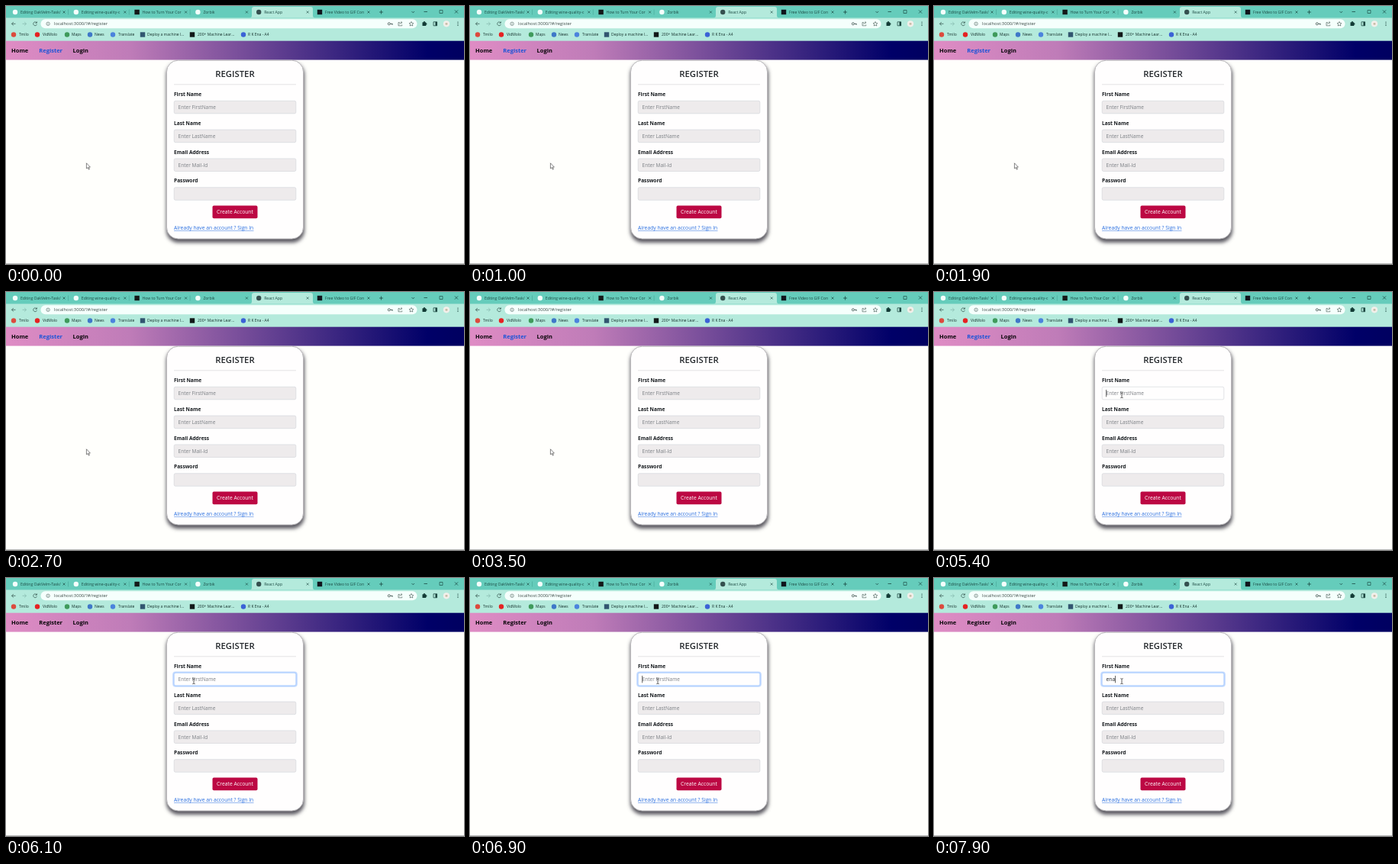
Recreate the animation shown at these times as an HTML page. Size 600x338 px, loop 8000 ms.

```html
<!DOCTYPE html>
<html lang="en">
<head>
<meta charset="utf-8">
<title>Register</title>
<style>
  html, body { margin: 0; width: 100%; height: 100%; overflow: hidden; background: #fffffc; }
  svg { display: block; width: 600px; height: 338px; font-family: "Open Sans", "Noto Sans", sans-serif; }
  text { white-space: pre; }
</style>
</head>
<body>
<svg id="stage" viewBox="0 0 600 338">
  <defs>
    <linearGradient id="bar">
      <stop offset="0" stop-color="#df8cc4"/>
      <stop offset=".27" stop-color="#bf7cb8"/>
      <stop offset=".92" stop-color="#000068"/>
      <stop offset="1" stop-color="#000060"/>
    </linearGradient>
    <filter id="soft" x="-10%" y="-10%" width="120%" height="120%">
      <feGaussianBlur stdDeviation="2.8"/>
    </filter>
  </defs>
</svg>
<script>
const LOOP = 8000;
const stage = document.getElementById('stage');
const INK = '#123b35';

function add(tag, attrs, parent = stage) {
  const node = document.createElementNS('http://www.w3.org/2000/svg', tag);
  for (const key in attrs) node.setAttribute(key, attrs[key]);
  parent.append(node);
  return node;
}
const rect = (x, y, width, height, fill, rx = 0, more) =>
  add('rect', { x, y, width, height, fill, rx, ...more });
const dot = (cx, cy, r, fill) => add('circle', { cx, cy, r, fill });
const line = (d, stroke = INK, width = 0.7, more) =>
  add('path', { d, stroke, fill: 'none', 'stroke-width': width, ...more });
function label(text, x, y, size, fill = '#212529', more) {
  const node = add('text', { x, y, 'font-size': size, fill, ...more });
  node.textContent = text;
  return node;
}
const cross = (x, y, r, color, width) =>
  line(`M${x - r} ${y - r}l${2 * r} ${2 * r}m0 ${-2 * r}l${-2 * r} ${2 * r}`, color, width);

function drawTabs() {
  rect(0, 0, 600, 16, '#65ccbb');
  add('path', { d: 'M319 15.5q3 0 3-3V4q0-3 3-3H399q3 0 3 3v8.500q0 3 3 3z', fill: '#b4eadc' });
  const tabs = [
    ['Editing OakVelm-Task/Fi', '#f4fffc', 'circle'],
    ['Editing wine-quality-c', '#f4fffc', 'circle'],
    ['How to Turn Your Cor', '#141818', 'square'],
    ['Zorbik', '#f4fffc', 'circle'],
    ['React App', '#35504f', 'circle'],
    ['Free Video to GIF Con', '#10141c', 'square']
  ];
  tabs.forEach(([title, color, shape], i) => {
    const x = 12 + i * 79.8;
    if (shape === 'circle') dot(x, 8, 3.2, color);
    else rect(x - 3.2, 4.8, 6.4, 6.4, color);
    const clip = add('clipPath', { id: 'tab' + i });
    add('rect', { x: x + 6, y: 0, width: 54, height: 16 }, clip);
    label(title, x + 7, 10, 5.1, '#1c4a43', { 'clip-path': `url(#tab${i})` });
    cross(x + 64, 8, 1.5, INK, 0.6);
    if (i < 3) line(`M${x + 69.500} 4.500v7`, '#3f9c8d', 0.5);
  });
  line('M489 8h5m-2.500-2.500v5');
  line('M531.5 7l1.800 1.800 1.800-1.800');
  line('M547.5 7.500h4.500');
  line('M568 5.500h4v4h-4z', INK, 0.6);
  cross(590, 7.5, 2.1, INK, 0.65);
}

function drawToolbar() {
  rect(0, 15.5, 600, 30.5, '#b4eadc');
  rect(45.5, 17.3, 493, 12, '#f5fffc', 6);
  line('M12.500 23.300h-5m2.300-2.300l-2.300 2.300 2.300 2.300', '#2b4b46');
  line('M21.500 23.300h5m-2.300-2.300l2.300 2.300-2.300 2.300', '#83b7ab');
  line('M40.200 22a2.400 2.400 0 1 0 .2 2.200m0-3.800v1.900h-1.900', '#2b4b46');
  line('M57.300 23.300a2.200 2.200 0 1 1-4.400 0a2.200 2.200 0 1 1 4.400 0M55.100 23v1.400m0-2.500v.5', '#4a5f5b', 0.6);
  label('localhost:3000/?#/register', 63, 25.3, 5.8, '#3c4a48');
  line('M503.300 23.300a1.500 1.500 0 1 1-3 0a1.500 1.500 0 1 1 3 0h3v1.400m-1.200-1.400v1', '#3b4f4b', 0.8);
  line('M515.800 21.500h-1.800v4.300h4.800v-1.300m-3.300-.6q.2-2.300 3.300-2.300m-1.300-1.300l1.500 1.300-1.500 1.400', '#3b4f4b', 0.6);
  line('M531 20.500l.9 1.900 2 .2-1.500 1.400.4 2-1.800-1-1.800 1 .4-2-1.500-1.400 2-.2z', '#3b4f4b', 0.6);
  rect(545.5, 21.2, 4.8, 4.8, INK, 0.6);
  dot(548, 21, 1, INK);
  dot(550.5, 23.5, 1, INK);
  line('M560 20.800h4.600v5h-4.600z', INK, 0.7);
  rect(562.5, 20.8, 2.1, 5, INK);
  dot(577, 23.3, 4.1, '#f2efea');
  rect(575.5, 22, 3, 2.7, '#c9bda8', 1);
  [21.2, 23.3, 25.4].forEach(y => dot(592, y, 0.6, INK));

  const marks = [
    [10, 'Tmilo', '#dc4a3d', 17],
    [41, 'VidMolo', '#e52222', 48],
    [80, 'Maps', '#3f9a5b', 86],
    [110, 'News', '#3f78c8', 116],
    [140, 'Translate', '#4b83dd', 147],
    [179, 'Deploy a machine l...', '#31556f', 185],
    [244, '200+ Machine Lear...', '#111818', 251],
    [311, 'R K Ena - A4', '#3b62d6', 317]
  ];
  marks.forEach(([x, name, color, at], i) => {
    if (i === 5 || i === 6) rect(x - 3.2, 34.3, 6.4, 6.4, color);
    else dot(x, 37.5, 3.2, color);
    label(name, at, 39.3, 5, '#15302b');
  });
}

function drawNav() {
  rect(0, 45.7, 600, 24.9, 'url(#bar)');
  const item = (name, x) => label(name, x, 61.4, 7.5, '#080508', { 'font-weight': 700 });
  item('Home', 7);
  item('Login', 87.6);
  return item('Register', 43.3);
}

function drawForm() {
  const fields = [['First Name', 'Enter FirstName'], ['Last Name', 'Enter LastName'],
    ['Email Address', 'Enter Mail-Id'], ['Password', '']];
  const clip = add('clipPath', { id: 'page' });
  add('rect', { x: 0, y: 70.6, width: 600, height: 268 }, clip);
  const shade = add('g', { 'clip-path': 'url(#page)' });
  shade.append(rect(210, 74, 181, 236, '#5a5860', 16, { filter: 'url(#soft)' }));
  rect(210.5, 71.2, 179, 233.8, '#fffefe', 15, { stroke: '#b9b7ba', 'stroke-width': 1 });
  label('REGISTER', 300, 93, 11.3, '#212529', { 'font-weight': 600, 'text-anchor': 'middle' });
  line('M220 102.800h160', '#d0cfd0', 0.6);
  const boxes = fields.map(([name, hint], i) => {
    const y = 124.3 + i * 37.8;
    label(name, 220, y - 6.3, 6.6, '#161a1e', { 'font-weight': 700 });
    const ring = rect(219.2, y - 0.8, 161.6, 18.2, 'none', 3,
      { stroke: '#0d6efd', 'stroke-opacity': 0.25, 'stroke-width': 2, opacity: 0 });
    const box = rect(220.2, y, 159.6, 16.6, '#eeebec', 1.8, { stroke: '#ced2d7', 'stroke-width': 0.6 });
    return { ring, box, hint: label(hint, 225.5, y + 10.9, 6.55, '#7b7f84') };
  });
  rect(270.5, 261.6, 59, 16.6, '#bc0843', 1.8);
  label('Create Account', 300, 272.4, 6.75, '#fff', { 'text-anchor': 'middle' });
  label('Already have an account ? Sign In', 220, 293.3, 6.75, '#2a6fe0');
  line('M220 294.500h104.500', '#2a6fe0', 0.5);
  rect(0, 337, 600, 1, '#b9bab8');
  return boxes[0];
}

drawTabs();
drawToolbar();
const active = drawNav();
const first = drawForm();
const typed = label('', 225.5, 135.2, 6.75);
const caret = rect(225.4, 128, 0.7, 9.4, '#222');
const arrow = add('path', { d: 'M0 0V7.200L1.700 5.700L2.900 8.400L4 7.900L2.900 5.300H5z',
  fill: '#fff', stroke: '#333', 'stroke-width': 0.6 });
const beam = line('M-1.700-3.500Q0-3.500 0-2.700Q0-3.500 1.700-3.500M0-2.700V2.700M-1.700 3.500Q0 3.500 0 2.700Q0 3.500 1.700 3.500', '#222', 0.7);

const NAME = 'ena';
const KEYS = [7250, 7450, 7650];
const MOVE = [3700, 4500];
const CLICK = 5350;
const progress = (t, from, to) => Math.min(1, Math.max(0, (t - from) / (to - from)));
const mix = (a, b, k) => a + (b - a) * k;
let shown = 0, textEnd = 225.4;

function draw(t) {
  const p = progress(t, ...MOVE);
  const k = p * p * (3 - 2 * p);
  const x = mix(105.4, 246, k), y = mix(205.8, 135.2, k);
  const inField = x > 220 && y < 141;
  arrow.style.display = inField ? 'none' : '';
  beam.style.display = inField ? '' : 'none';
  (inField ? beam : arrow).setAttribute('transform', `translate(${x} ${y})`);

  const focused = t >= CLICK;
  const glow = progress(t, 5410, 5560);
  first.box.setAttribute('fill', focused ? '#fffefe' : '#eeebec');
  first.box.setAttribute('stroke', `rgb(${mix(206, 134, glow)},${mix(210, 183, glow)},${mix(215, 254, glow)})`);
  first.ring.setAttribute('opacity', glow);
  active.setAttribute('fill', `rgb(${mix(30, 8, glow)},${mix(85, 5, glow)},${mix(215, 8, glow)})`);

  const count = KEYS.filter(key => t >= key).length;
  if (count !== shown) {
    typed.textContent = NAME.slice(0, count);
    textEnd = 225.4 + (count && typed.getComputedTextLength() + 0.2);
    shown = count;
  }
  first.hint.style.display = count ? 'none' : '';
  const since = t - (count ? KEYS[count - 1] : CLICK + 40);
  caret.setAttribute('x', textEnd);
  caret.style.display = focused && since % 1060 < 530 ? '' : 'none';
}

const start = performance.now();
function tick(now) {
  draw(Math.max(0, now - start) % LOOP);
  requestAnimationFrame(tick);
}
draw(0);
requestAnimationFrame(tick);
</script>
</body>
</html>
```
